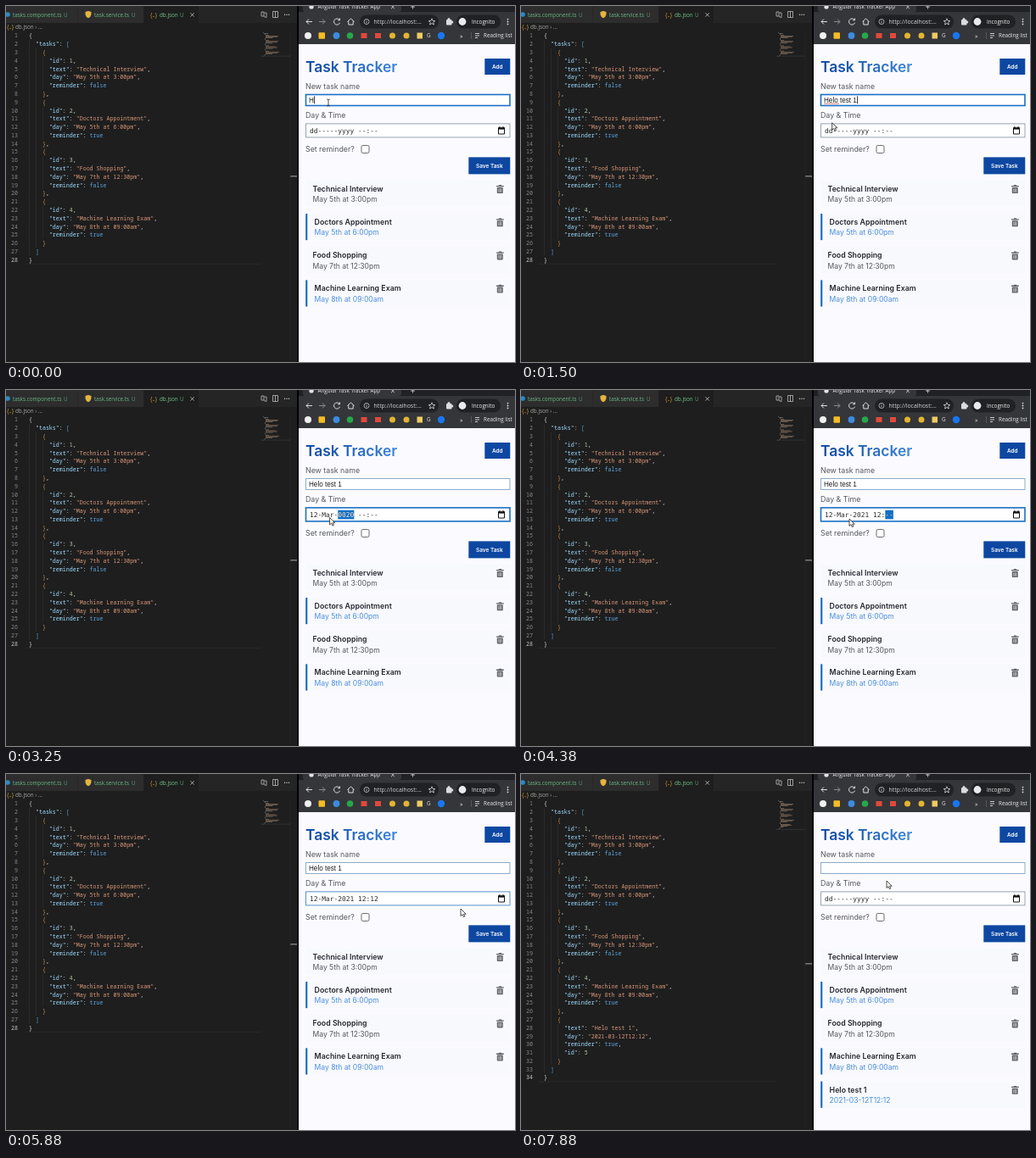
An HTML page for the animation above (8000 ms loop, 600 by 420 pixels).

```html
<!DOCTYPE html>
<html lang="en">
<head>
<meta charset="utf-8">
<title>Task tracker demo</title>
<style>
html, body { margin: 0; width: 100%; height: 100%; overflow: hidden; background: #000; }
svg { display: block; width: 600px; height: 420px; }
text { white-space: pre; }
.code { font: 500 6.63px "Noto Sans Mono", "DejaVu Sans Mono", monospace; }
.ui { font: 6.3px "Open Sans", "Noto Sans", sans-serif; }
.url { font-size: 6.9px; }
.h1 { font: 600 17.4px Inter, sans-serif; }
.label { font: 8.8px Inter, sans-serif; fill: #55575d; }
.name { font: 600 8.75px Inter, sans-serif; fill: #24262d; letter-spacing: .04px; }
.day { font: 8.55px Inter, sans-serif; fill: #55575d; }
.due { fill: #4a8edb; }
.btn { font: 600 6.45px Inter, sans-serif; fill: #fff; }
.input { font: 8.15px "Liberation Sans", Arial, sans-serif; fill: #222; }
.date { font: 7.9px "DejaVu Sans Mono", monospace; fill: #2a2a2a; }
</style>
</head>
<body>
<svg id="stage" viewBox="0 0 600 420"></svg>
<script>
const LOOP = 8000, STEP = 125;
const stage = document.getElementById('stage');

function el(tag, attrs, parent = stage) {
  const node = document.createElementNS('http://www.w3.org/2000/svg', tag);
  for (const key in attrs) node.setAttribute(key, attrs[key]);
  parent.appendChild(node);
  return node;
}
const group = () => el('g', {});
const rect = (x, y, width, height, fill, parent, extra) =>
  el('rect', { x, y, width, height, fill, ...extra }, parent);
const dot = (cx, cy, r, fill, parent) => el('circle', { cx, cy, r, fill }, parent);
const line = (d, stroke, width = 1, parent) =>
  el('path', { d, stroke, 'stroke-width': width, fill: 'none' }, parent);
function text(x, y, str, cls, parent, extra) {
  const node = el('text', { x, y, class: cls, ...extra }, parent);
  node.textContent = str;
  return node;
}
const label = (x, y, str, fill, cls = 'ui') => text(x, y, str, cls, stage, { fill });
const show = (node, on) => node.setAttribute('visibility', on ? 'visible' : 'hidden');

const tasks = [
  { name: 'Technical Interview', day: 'May 5th at 3:00pm', due: false },
  { name: 'Doctors Appointment', day: 'May 5th at 6:00pm', due: true },
  { name: 'Food Shopping', day: 'May 7th at 12:30pm', due: false },
  { name: 'Machine Learning Exam', day: 'May 8th at 09:00am', due: true },
  { name: 'Helo test 1', day: '2021-03-12T12:12', due: true }
];

// ---- editor ----
const LINE = 9.79, CHAR = 3.98;

function jsonLines(count) {
  const out = [[0, '{'], [2, '"tasks": [']];
  tasks.slice(0, count).forEach((task, i) => {
    const fields = [`"text": "${task.name}"`, `"day": "${task.day}"`, `"reminder": ${task.due}`];
    const id = `"id": ${i + 1}`;
    if (i < 4) fields.unshift(id); else fields.push(id);
    out.push([4, '{']);
    fields.forEach((f, n) => out.push([6, f + (n < 3 ? ',' : '')]));
    out.push([4, i < count - 1 ? '},' : '}']);
  });
  return out.concat([[2, ']'], [0, '}']]);
}

function tokenColor(token, rest, indent) {
  if (token[0] === '"') return rest[0] === ':' ? '#9cdcfe' : '#d8977a';
  if (/^[a-z]/.test(token)) return '#5ba3dd';
  if (/^\d/.test(token)) return '#b5cea8';
  if (/[[\]]/.test(token)) return '#4a9fd6';
  if (/[{}]/.test(token) && indent) return '#c58c52';
  return '#d8d8d8';
}

function drawCode(count, markY) {
  const g = group(), lines = jsonLines(count), last = lines.length - 1;
  line(`M20 ${30.2 + (last + 1) * LINE}H300`, '#282828', 1, g);
  lines.forEach(([indent, str], i) => {
    const y = 37.4 + i * LINE;
    for (let depth = 0; depth < indent; depth += 2)
      line(`M${27.5 + depth * CHAR} ${y - 7.2}v${LINE}`, '#343434', .6, g);
    text(14, y, i + 1, 'code', g, { 'text-anchor': 'end', fill: i === last ? '#c6c6c6' : '#85888c' });
    const row = text(27 + indent * CHAR, y, '', 'code', g);
    for (const m of str.matchAll(/"[^"]*"|[a-z]+|\d+|[^"\w]/g)) {
      const fill = tokenColor(m[0], str.slice(m.index + m[0].length), indent);
      el('tspan', { fill }, row).textContent = m[0];
    }
    rect(303 + indent * .5, 31 + i * 1.04, Math.max(1, str.length * .5), .7,
      indent === 6 ? '#86705f' : '#777', g);
  });
  rect(300, 30.6 + last * 1.04, 35, .8, '#363636', g);
  rect(335, markY, 8, 1.3, '#8a8a8a', g);
  return g;
}

function drawTab(x, width, back, nameX, name, color, statusX) {
  rect(x, 0, width, 20, back);
  label(nameX, 12.7, name, color);
  label(statusX, 12.7, 'U', color).setAttribute('opacity', .75);
}

rect(0, 0, 343, 420, '#1e1e1e');
rect(0, 0, 343, 20, '#252526');
drawTab(0, 84, '#2d2d2d', 8, 'tasks.component.ts', '#69b98a', 68);
drawTab(84.5, 77.5, '#2d2d2d', 104, 'task.service.ts', '#69b98a', 148);
drawTab(162.5, 64.5, '#1e1e1e', 181, 'db.json', '#73c991', 205);
dot(2, 10, 2.8, '#2b8ac6');
el('path', { d: 'M93.5 7L97 5.8L100.5 7V10Q100 13 97 14.3Q94 13 93.5 10Z', fill: '#e3b341' });
label(170, 12.6, '{..}', '#d6a13c');
line('M217.5 8.3l4.2 4.2m0 -4.2l-4.2 4.2', '#d0d0d0', .8);
line('M301 7h3v5h-3zM304.5 8h2.5v5.5M304 12.5l3 1', '#bdbdbd', .8);
line('M314.5 6.5h6v7h-6zM317.5 6.5v7', '#bdbdbd', .8);
[328.5, 331, 333.5].forEach(x => dot(x, 10.3, .7, '#cfcfcf'));
label(1, 26.6, '{..}', '#d6a13c');
label(11, 26.6, 'db.json › ...', '#a8a8a8');

const codeBefore = drawCode(4, 200.2);
const codeAfter = drawCode(5, 223.2);
line('M335 30V420', '#292929', .6);

// ---- browser chrome ----
const PALE = '#dadce0', PILL = '#202124';
rect(343, 0, 2, 420, '#000');
rect(345, 0, 255, 45, '#35363a');
rect(345, 0, 255, 7, PILL);
rect(350, -4, 116, 11, '#35363a', stage, { rx: 3 });
dot(360, 1, 2.6, '#e4e4e4');
label(367.5, 3.3, 'Angular Task Tracker App', '#e8eaed');
line('M454 -.8l4 4m0 -4l-4 4M477 1h5M479.5 -1.5v5', '#d5d7da', .8);

line('M361 18.5h-7m3 -3l-3 3l3 3', PALE);
line('M369 18.5h7m-3 -3l3 3l-3 3', '#8a8c90');
line('M393 16.3A3.6 3.6 0 1 0 393.5 19.8M393.5 14.5v2.3h-2.3', PALE);
line('M402.5 18.5l4 -3.6l4 3.6M403.8 17.8v4.2h5.4v-4.2', PALE);
rect(417, 10.5, 93, 16, PILL, stage, { rx: 8 });
line('M422 18.5a3 3 0 1 0 6 0a3 3 0 1 0 -6 0M425 18v2M425 16.6v.7', '#c5c8cc', .8);
label(433.5, 21, 'http://localhost:...', '#d4d6da', 'ui url');
line('M502 14.8l1.1 2.6l2.7 .2l-2.1 1.7l.7 2.7l-2.4 -1.5l-2.4 1.5l.7 -2.7l-2.1 -1.7l2.7 -.2z', PALE, .8);
rect(519, 16, 6.5, 6.5, PALE, stage, { rx: 1 });
dot(522, 15.6, 1.5, PALE);
dot(525.8, 19, 1.5, PALE);
rect(531, 10.5, 52, 16, PILL, stage, { rx: 8 });
dot(538, 18.5, 4.4, '#e8eaed');
label(549, 20.8, 'Incognito', '#f1f3f4');
[15.6, 18.5, 21.4].forEach(y => dot(591.5, y, .9, PALE));

// bookmarks
dot(356, 35, 4, '#f0f0f0');
rect(368.5, 31.2, 7.5, 7.5, '#f4bd23', stage, { rx: 1 });
dot(389.5, 35, 3.9, '#3d8be0');
dot(405.5, 35, 3.8, '#24a848');
[422, 438.5].forEach(x => rect(x - 3.5, 32, 7, 6, '#df493c'));
[455.5, 472].forEach(x => dot(x, 35, 3.5, '#e3b52f'));
rect(484.5, 31.5, 6.5, 7, '#f0cb61');
label(496, 37.4, 'G', '#e0e2e5');
dot(513, 35, 4.2, '#1877f2');
label(535, 37.6, '»', '#e8eaed', 'ui url');
line('M548.5 31v8', '#5b5d61', .8);
line('M553 32.5h5M553 35h5M553 37.5h3', PALE, .9);
label(563, 37.3, 'Reading list', '#e8eaed');

// ---- page ----
const shade = el('linearGradient', { id: 'shade', gradientUnits: 'userSpaceOnUse', x1: 353, x2: 462 }, el('defs', {}));
el('stop', { offset: 0, 'stop-color': '#0d47a1' }, shade);
el('stop', { offset: 1, 'stop-color': '#3f86d8' }, shade);

rect(345, 45, 255, 375, '#fbfbff');
label(353, 77.7, 'Task Tracker', 'url(#shade)', 'h1');
text(353, 97.6, 'New task name', 'label');
text(353, 132.2, 'Day & Time', 'label');
text(353, 172.2, 'Set reminder?', 'label');

function drawButton(x, y, width, height, str) {
  rect(x, y, width, height, '#0d47a1');
  text(x + width / 2, y + height / 2 + 2.3, str, 'btn', stage, { 'text-anchor': 'middle' });
}
drawButton(564.3, 62, 30, 19, 'Add');
drawButton(545.3, 178.4, 49, 20, 'Save Task');

const nameBox = rect(353.5, 104.5, 240.5, 13, '#fff');
const nameText = text(357, 113.5, '', 'input');
const typo = line('M357 115.2H375', '#b85050', .7);
const caret = rect(0, 106.3, .8, 9, '#111');

const DATE_X = 358, DATE_CHAR = 4.757;
const dateBox = rect(353.5, 138.9, 240.5, 16, '#fff');
const mark = rect(0, 141.8, 0, 10.6, '#0f6fc9');
const dateText = text(DATE_X, 149.8, '', 'date');
const dateMarked = text(0, 149.8, '', 'date', stage, { style: 'fill:#fff' });
line('M580.5 144.5h7v6.5h-7zM582 142v2M586 142v2', '#111');
rect(580, 143.2, 8, 2.4, '#111');

rect(419, 164.5, 9, 9, '#fff', stage, { rx: 1.6, stroke: '#6c6c6c' });
const check = group();
rect(418.6, 164.1, 9.8, 9.8, '#0d47a1', check, { rx: 1.6 });
line('M420.8 169.2l2 2.1l3.7 -4.5', '#fff', 1.3, check);

function drawTask(task, i) {
  const g = group(), y = 205.8 + i * 39.2, x = task.due ? 363.6 : 361.5;
  rect(353.5, y, 241, 31.2, '#f8f9fd', g);
  if (task.due) rect(353.2, y, 2.1, 31.2, '#1769bf', g);
  text(x, y + 13, task.name, 'name', g);
  text(x, y + 25.4, task.day, task.due ? 'day due' : 'day', g);
  el('path', { d: `M578 ${y + 6.2}h2.5l.8 -.9h2.4l.8 .9h2.3v1.3h-8.8z`, fill: '#63656a' }, g);
  rect(578.8, y + 8.2, 7, 7, '#63656a', g, { rx: .8 });
  for (const bar of [580.8, 582.3, 583.8]) line(`M${bar} ${y + 9.5}v4.5`, '#eee', .6, g);
  return g;
}
const cards = tasks.map(drawTask);

const arrow = el('path', { d: 'M0 0V8.5L2 6.7L3.4 9.7L4.8 9L3.5 6.2H6.2Z', fill: '#fff', stroke: '#222', 'stroke-width': .8 });
const beam = line('M-1.8 -4Q0 -4 0 -3Q0 -4 1.8 -4M0 -3V3M-1.8 4Q0 4 0 3Q0 4 1.8 4', '#222', .8);

// ---- motion ----
// step, value, selected range
const dates = [
  [0, 'dd-----yyyy --:--'],
  [14, 'dd-----yyyy --:--', 0, 2],
  [16, '01-----yyyy --:--', 0, 2],
  [17, '12-----yyyy --:--', 3, 6],
  [22, '12-Mar-yyyy --:--', 7, 11],
  [25, '12-Mar-0002 --:--', 7, 11],
  [26, '12-Mar-0020 --:--', 7, 11],
  [27, '12-Mar-0202 --:--', 7, 11],
  [28, '12-Mar-2021 --:--', 7, 11],
  [31, '12-Mar-2021 --:--', 12, 14],
  [33, '12-Mar-2021 01:--', 12, 14],
  [34, '12-Mar-2021 12:--', 15, 17],
  [36, '12-Mar-2021 12:01', 15, 17],
  [37, '12-Mar-2021 12:12', 15, 17],
  [44, '12-Mar-2021 12:12'],
  [58, 'dd-----yyyy --:--']
];
// step, x, y
const path = [
  [0, 380, 114], [10, 380, 114], [13, 362, 146], [17, 365, 146], [22, 380, 150],
  [35, 387, 152], [37, 387, 152], [41, 536, 159], [47, 536, 159], [50, 422, 168],
  [52, 422, 168], [54, 541, 176], [56, 562, 187], [58, 562, 187], [63, 431, 126]
];
const typed = k => k < 7 ? k + 1 : k + 2;

function pointer(k) {
  const i = path.findIndex((p, n) => n && k <= p[0]);
  const [a, ax, ay] = path[i - 1], [b, bx, by] = path[i];
  const u = (k - a) / (b - a), e = u * u * (3 - 2 * u);
  return [ax + (bx - ax) * e, ay + (by - ay) * e];
}

function border(box, color, width) {
  box.setAttribute('stroke', color);
  box.setAttribute('stroke-width', width);
}
const FOCUS = ['#1b70c6', 1.6];

function drawName(k, saved) {
  const focus = k < 14;
  nameText.textContent = saved ? '' : 'Helo test 1'.slice(0, typed(k));
  border(nameBox, ...(focus ? FOCUS : ['#8eabc9', 1]));
  show(caret, focus);
  show(typo, focus && typed(k) > 4);
  caret.setAttribute('x', 357.3 + nameText.getComputedTextLength());
}

function drawDate(k) {
  const [, value, from = 0, to = 0] = dates.filter(d => d[0] <= k).pop();
  const x = DATE_X + from * DATE_CHAR;
  dateText.textContent = value;
  dateMarked.textContent = value.slice(from, to);
  dateMarked.setAttribute('x', x);
  mark.setAttribute('x', x);
  mark.setAttribute('width', (to - from) * DATE_CHAR);
  if (to) border(dateBox, ...FOCUS);
  else border(dateBox, k >= 44 && k < 50 ? '#5591cc' : '#98a3b0', 1);
}

function render(time) {
  const k = Math.floor((time % LOOP) / STEP);
  const saved = k >= 58;
  drawName(k, saved);
  drawDate(k);
  show(check, k >= 51 && !saved);
  show(codeBefore, !saved);
  show(codeAfter, saved);
  show(cards[4], saved);
  const [x, y] = pointer(k);
  const overName = y > 104 && y < 118;
  show(beam, overName);
  show(arrow, !overName);
  for (const c of [beam, arrow]) c.setAttribute('transform', `translate(${x} ${y})`);
}

function tick() {
  render(performance.now());
  requestAnimationFrame(tick);
}
tick();
</script>
</body>
</html>
```
